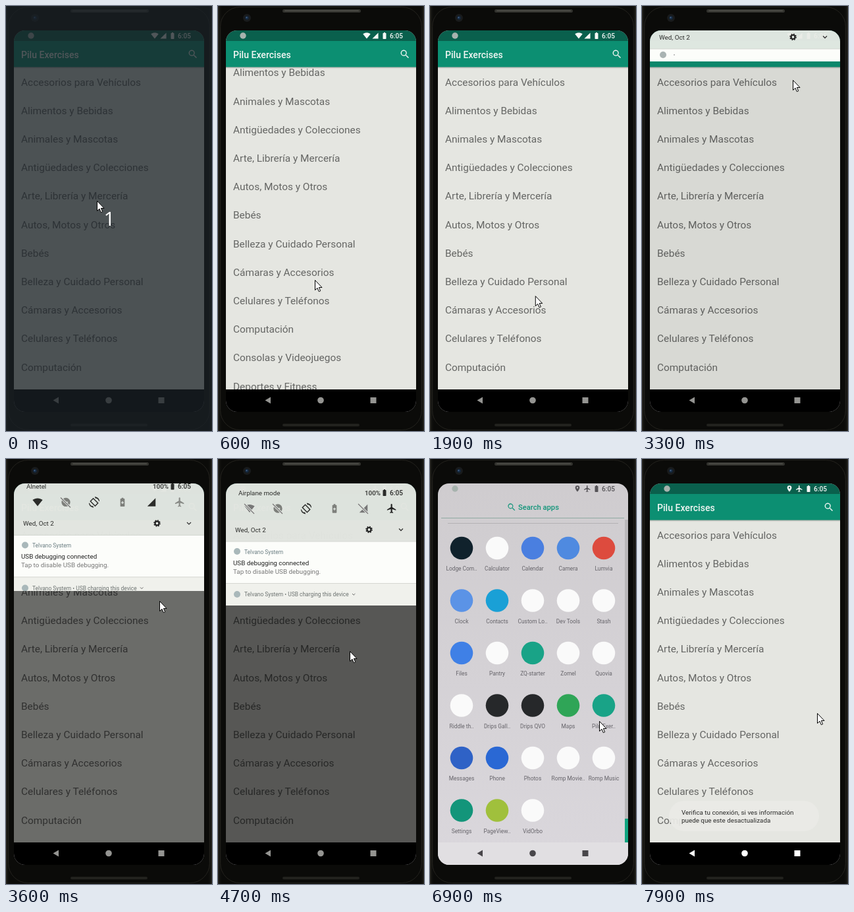
An HTML page for the animation above (8000 ms loop, 313x644 px).

```html
<!DOCTYPE html>
<html lang="es">
<head>
<meta charset="utf-8">
<title>Phone demo</title>
<style>
html, body { margin: 0; width: 100%; height: 100%; overflow: hidden; background: #0b0b09; }
svg { display: block; width: 100vw; height: 100vh; font-family: Roboto, "Noto Sans", sans-serif; }
</style>
</head>
<body>
<svg id="stage" viewBox="0 0 313 644"></svg>
<script>
const LOOP = 8000, STEP = 100;
const TOP = 37, SHADE_END = 222, ROW = 43.2;

const categories = [
  'Accesorios para Vehículos', 'Alimentos y Bebidas', 'Animales y Mascotas',
  'Antigüedades y Colecciones', 'Arte, Librería y Mercería', 'Autos, Motos y Otros',
  'Bebés', 'Belleza y Cuidado Personal', 'Cámaras y Accesorios', 'Celulares y Teléfonos',
  'Computación', 'Consolas y Videojuegos', 'Deportes y Fitness',
  'Electrodomésticos y Aires Ac.', 'Electrónica, Audio y Video', 'Entradas para Eventos',
  'Herramientas y Construcción', 'Hogar, Muebles y Jardín', 'Industrias y Oficinas',
  'Inmuebles', 'Instrumentos Musicales', 'Joyas y Relojes', 'Juegos y Juguetes'
];

const apps = [
  ['Lodge Com..', '#10222c'], ['Calculator', '#fafafa'], ['Calendar', '#4a7fe0'], ['Camera', '#4f8ae0'], ['Lumvia', '#dd4b3e'],
  ['Clock', '#5b93e6'], ['Contacts', '#1aa0d6'], ['Custom Lo..', '#fafafa'], ['Dev Tools', '#fafafa'], ['Stash', '#fafafa'],
  ['Files', '#3f80e6'], ['Pantry', '#fafafa'], ['ZQ-starter', '#19a387'], ['Zomel', '#fafafa'], ['Quovia', '#fafafa'],
  ['Riddle th..', '#fafafa'], ['Drips Gall..', '#26282a'], ['Drips QVO', '#26282a'], ['Maps', '#2fa557'], ['Pilu Exer..', '#19a387'],
  ['Messages', '#2f62c6'], ['Phone', '#2a68d4'], ['Photos', '#fafafa'], ['Romp Movie..', '#fafafa'], ['Romp Music', '#fafafa'],
  ['Settings', '#13957a'], ['PageView..', '#a0c03c'], ['VidOrbo', '#fafafa']
];

// Icon outlines on a 24 unit grid.
const glyphs = {
  plane: 'M21 16v-2l-8-5V3.5a1.5 1.5 0 0 0-3 0V9l-8 5v2l8-2.5V19l-2 1.5V22l3.5-1 3.5 1v-1.5L13 19v-5.5z',
  search: 'M15.5 14h-.8l-.3-.3A6.5 6.5 0 1 0 13.7 14.4l.3.3v.8l5 5 1.5-1.5zm-6 0a4.5 4.5 0 1 1 0-9 4.5 4.5 0 0 1 0 9z',
  wifi: 'M12 21L.6 6.8C4 4.3 8 3 12 3s8 1.3 11.4 3.8z',
  signal: 'M2 22h20V2z',
  battery: 'M8.3 4H10V2h4v2h1.7Q17 4 17 5.3v15.4Q17 22 15.7 22H8.3Q7 22 7 20.7V5.3Q7 4 8.3 4z',
  saver: 'M8.3 4H10V2h4v2h1.7Q17 4 17 5.3v15.4Q17 22 15.7 22H8.3Q7 22 7 20.7V5.3Q7 4 8.3 4zM11 10v2H9v2h2v2h2v-2h2v-2h-2v-2z',
  pin: 'M12 2a7 7 0 0 0-7 7c0 5.3 7 13 7 13s7-7.700 7-13a7 7 0 0 0-7-7zm0 9.500a2.500 2.500 0 0 1 0-5 2.500 2.500 0 0 1 0 5z',
  dnd: 'M12 2a10 10 0 1 0 0 20 10 10 0 0 0 0-20zM7 11h10v2H7z',
  rotate: 'M10 2.500L2.500 10 14 21.500l7.500-7.500zm0 2.800L18.700 14 14 18.700 5.300 10zM15 .5a11 11 0 0 1 8.500 9.500H22A9 9 0 0 0 16 3.500l-1 1-2-4zM9 23.500A11 11 0 0 1 .5 14H2a9 9 0 0 0 6 6.500l1-1 2 4z'
};

const icon = (name, x, y, size, attrs = '') =>
  `<path d="${glyphs[name]}" fill-rule="evenodd" transform="translate(${x - size / 2} ${y - size / 2}) scale(${size / 24})" ${attrs}/>`;
const text = (str, x, y, size, attrs = '') =>
  `<text x="${x}" y="${y}" font-size="${size}" ${attrs}>${str}</text>`;
const rect = (x, y, w, h, fill, attrs = '') =>
  `<rect x="${x}" y="${y}" width="${w}" height="${h}" fill="${fill}" ${attrs}/>`;
const dot = (x, y, r, fill, attrs = '') => `<circle cx="${x}" cy="${y}" r="${r}" fill="${fill}" ${attrs}/>`;
const slash = (x, y) =>
  `<path d="M${x - 8} ${y - 7}L${x + 7} ${y + 8}" stroke="#e2e5e0" stroke-width="3.200"/><path d="M${x - 8} ${y - 7}L${x + 7} ${y + 8}" stroke="#777" stroke-width="1.300"/>`;

const body = `
  ${rect(0, 0, 313, 644, '#0b0b09')}
  ${rect(0, 0, 6, 644, 'url(#edge)')}
  <rect x="307" width="6" height="644" fill="url(#edge)" transform="rotate(180 310 322)"/>
  <rect x="3.500" y="1.500" width="306" height="641" rx="30" fill="none" stroke="#23221d"/>
  ${rect(98, 5, 119, 5, '#32322e', 'rx="2.500"')}${rect(101, 6.500, 113, 1.500, '#50504a', 'rx=".7"')}
  ${rect(98, 633, 117, 4, '#22221e', 'rx="2"')}
  ${dot(44, 18, 6, '#191b1c')}${dot(44, 18, 2.800, '#14283f')}${dot(43.500, 17.500, 1, '#526f96')}`;

const drawer = `
  ${rect(12, 37, 289, 578, 'url(#wall)')}
  ${rect(296, 92, 5, 489, '#b9b7b9')}${rect(296, 545, 5, 36, '#10a47f')}
  ${icon('search', 124, 73, 15, 'fill="#12957a"')}
  ${text('Search apps', 134, 77, 11.200, 'fill="#12957a" font-weight="500"')}
  ${rect(17, 89, 278, 1, '#8fa9a2')}${rect(27, 97, 259, 1, '#b3b1b4')}
  ${apps.map(([name, color], i) => {
    const x = 48 + i % 5 * 54, y = 135 + Math.floor(i / 5) * 79.500;
    return dot(x, y, 17.300, color) + text(name, x, y + 34, 8.400, 'fill="#66646a" text-anchor="middle"');
  }).join('')}`;

const app = `
  ${rect(12, 37, 289, 16, '#0a604d')}
  <g clip-path="url(#listClip)">
    ${rect(12, 92, 289, 489, '#e5e6e1')}
    <g id="list" fill="#656664">${categories.map((c, i) => text(c, 23, 120.600 + i * ROW, 15.430)).join('')}</g>
  </g>
  ${rect(12, 92, 289, 3, 'url(#shadow)')}
  ${rect(12, 53, 289, 39.500, '#0c8f72')}
  ${text('Pilu Exercises', 23, 78.600, 14.060, 'fill="#f1f6f3" font-weight="500"')}
  ${icon('search', 284, 73, 17, 'fill="#f1f6f3"')}`;

const status = `
  ${dot(38, 45, 4.700, '#a7b3ae')}
  ${icon('battery', 253, 45, 12)}
  ${text('6:05', 261, 48.700, 10.100, 'font-weight="500"')}
  <g id="online">${icon('wifi', 226, 45, 12)}${icon('signal', 239, 45, 11)}</g>
  <g id="offline">${icon('plane', 239, 45, 12)}</g>
  <g id="located">${icon('pin', 224, 45, 11.500)}</g>`;

const shade = `
  <g id="header">
    ${rect(12, -30, 289, 155, '#e9ece7', 'opacity=".95"')}
    <g fill="#2b2c2a">
      <g id="carrier">${text('Alnetel', 31, 54.500, 9.840)}</g>
      <g id="planeMode">${text('Airplane mode', 31, 54.500, 9.840)}</g>
      ${text('100%', 223, 54.500, 9.840, 'font-weight="500"')}
      ${icon('battery', 253, 51, 12)}
      ${text('6:05', 261, 54.700, 10.100, 'font-weight="500"')}
      ${icon('rotate', 134, 75, 17)}
      <g id="radios">${icon('wifi', 48, 75, 16)}${icon('signal', 221, 75, 15)}</g>
      <g id="tilePlane">${icon('plane', 264, 75, 17)}</g>
      ${text('Wed, Oct 2', 26, 110.500, 9.840)}
    </g>
    <g fill="#7d7f7b">${icon('dnd', 91, 75, 16)}${icon('saver', 177, 75, 16)}</g>
    ${slash(91, 75)}
    <g id="radiosOff">${slash(48, 75)}${slash(221, 75)}</g>
    <circle id="tap" cx="264" cy="75" r="17" opacity=".12"/>
    <circle cx="229.500" cy="107" r="3" fill="none" stroke="#222" stroke-width="2.200"/>
    <circle cx="229.500" cy="107" r="4.600" fill="none" stroke="#222" stroke-width="1.400" stroke-dasharray="1.900 1.711"/>
    <path d="M275 105.500l3 3 3-3" fill="none" stroke="#333" stroke-width="1.300"/>
    ${rect(12, 125, 289, 64, '#fcfdfa')}${rect(12, 124.500, 289, 1, '#d5d8d3')}
    ${rect(12, 188, 289, 34, '#f0f1ec')}${rect(12, 188, 289, 1, '#d5d6d1')}
    <g id="shelf">${dot(32, 134, 5, '#a9b3b2')}${dot(49, 134, 0.800, '#777')}</g>
    <g id="notices">
      ${dot(29, 140, 5, '#a9b8ba')}${text('Telvano System', 40, 143.500, 8.440, 'fill="#6a7d82"')}
      ${text('USB debugging connected', 23, 160.500, 9.840, 'fill="#222"')}
      ${text('Tap to disable USB debugging.', 23, 174, 9.840, 'fill="#777"')}
      ${dot(29, 205, 5, '#a9b8ba')}${text('Telvano System • USB charging this device', 40, 208.200, 8.440, 'fill="#6d7371"')}
      <path d="M204 204l2.200 2.200 2.200-2.200" fill="none" stroke="#666"/>
    </g>
  </g>`;

const toast = `
  ${rect(41, 518, 228, 46, '#ebebe7', 'rx="23" opacity=".93"')}
  <g fill="#2b2b2a">${text('Verifica tu conexión, si ves información', 60, 539, 9.840)}
  ${text('puede que este desactualizada', 60, 551, 9.840)}</g>`;

const stage = document.getElementById('stage');
stage.innerHTML = `
  <defs>
    <clipPath id="screen"><rect x="12" y="37" width="289" height="578" rx="17"/></clipPath>
    <clipPath id="listClip"><rect x="12" y="92" width="289" height="489"/></clipPath>
    <clipPath id="shadeClip"><rect id="shadeBox" x="12" y="37" width="289" height="0"/></clipPath>
    <linearGradient id="edge"><stop stop-color="#2a2822"/><stop offset=".4" stop-color="#12120f"/><stop offset="1" stop-color="#0b0b09"/></linearGradient>
    <linearGradient id="wall" x2="0" y2="1"><stop stop-color="#cfcccf"/><stop offset="1" stop-color="#dad7dc"/></linearGradient>
    <linearGradient id="shadow" x2="0" y2="1"><stop stop-opacity=".3"/><stop offset="1" stop-opacity="0"/></linearGradient>
  </defs>
  ${body}
  <g clip-path="url(#screen)">
    <g id="drawer">${drawer}</g>
    <rect id="navBar" x="12" y="581" width="289" height="34"/>
    <g id="app">${app}</g>
    <g id="status">${status}</g>
    ${rect(38, 582, 76, 33, '#fff', 'id="ripple" rx="16" opacity=".1"')}
    <g id="nav"><path d="M71.500 597.500l8.500-5v10z"/>${dot(156, 597.500, 4.800, 'inherit')}<path d="M231.500 593h9v9h-9z"/></g>
    <g id="toast">${toast}</g>
    ${rect(12, 37, 289, 544, '#000', 'id="scrim"')}
    <g clip-path="url(#shadeClip)">${shade}</g>
  </g>
  <g id="countdown">
    ${rect(0, 0, 313, 644, '#1a2026', 'opacity=".75"')}
    <text x="157" y="333" font-size="30" fill="#fff" text-anchor="middle" font-family="Open Sans, sans-serif">1</text>
  </g>
  <path id="cursor" d="M.5.5V15.500L4 12.300 6.300 17.700 8.700 16.700 6.400 11.500H11z" fill="#fff" stroke="#000"/>`;

const el = {};
stage.querySelectorAll('[id]').forEach(node => {
  el[node.id] = node;
  // Circles marked "inherit" take the colour of their group.
});
el.nav.querySelector('circle').removeAttribute('fill');

const track = (keys, t) => {
  const i = keys.findIndex(k => k[0] > t);
  if (i < 0) return keys[keys.length - 1].slice(1);
  const [a, b] = [keys[i - 1], keys[i]];
  const p = (t - a[0]) / (b[0] - a[0]);
  return a.slice(1).map((v, j) => v + (b[j + 1] - v) * p);
};

const cursorPath = [
  [0, 138, 295], [500, 146, 470], [900, 150, 250], [1100, 147, 174], [1400, 147, 174],
  [1800, 152, 488], [2700, 222, 48], [3000, 222, 48], [3300, 229, 112], [3600, 233, 215],
  [3700, 236, 205], [3900, 257, 92], [4000, 257, 75], [4400, 257, 75], [4700, 200, 291],
  [4800, 200, 291], [5000, 195, 131], [5100, 195, 131], [6000, 75, 597], [6400, 75, 597],
  [6500, 143, 560], [6600, 143, 560], [6900, 257, 397], [7100, 266, 385]
];
const scrollPath = [[0, 0], [500, 0], [900, 230], [1000, 300], [1200, 428], [1400, 470], [1500, 430], [1800, 0]];
const shadePath = [[0, 37], [3000, 37], [3100, 64], [3300, 84], [3600, 200], [3800, 222], [4800, 222], [4900, 110], [5000, 37]];
const appPath = [
  [0, 0, 1], [6000, 0, 1], [6100, 6, 1], [6200, 28, .45], [6300, 60, 0],
  [7200, 60, 0], [7300, 40, .4], [7400, 12, .85], [7500, 0, 1]
];
const toastPath = [[0, 0], [7700, 0], [7800, .5], [7900, 1]];

const show = (name, on) => el[name].setAttribute('display', on ? 'inline' : 'none');
const move = (name, x, y) => el[name].setAttribute('transform', `translate(${x} ${y})`);
const set = (name, attr, value) => el[name].setAttribute(attr, value);

function draw(time) {
  const t = Math.floor(time / STEP) * STEP;
  const atHome = t >= 6300 && t < 7300;
  const airplane = t >= 4400;

  move('cursor', ...track(cursorPath, t));
  move('list', 0, -track(scrollPath, t)[0]);

  const [drop, alpha] = track(appPath, t);
  move('app', 0, drop);
  set('app', 'opacity', alpha);

  const bottom = track(shadePath, t)[0];
  const open = (bottom - 84) / (SHADE_END - 84);
  set('shadeBox', 'height', bottom - TOP);
  move('header', 0, -60 * (1 - open));
  set('scrim', 'opacity', bottom > TOP ? Math.max(0, .06 + .56 * open) : 0);
  show('shelf', open < .3);
  show('notices', open >= .3);
  show('carrier', !airplane);
  show('planeMode', airplane);
  show('radiosOff', airplane);
  set('radios', 'fill', airplane ? '#777' : '#2b2c2a');
  set('tilePlane', 'fill', airplane ? '#222' : '#888a86');
  show('tap', t >= 4300 && t < 4600);

  show('online', !airplane);
  show('offline', airplane);
  show('located', t >= 6300);
  set('status', 'fill', atHome ? '#555357' : '#f4f7f5');

  set('navBar', 'fill', atHome ? '#e1dfe2' : '#000');
  set('nav', 'fill', atHome ? '#48464a' : t < 6000 ? '#949491' : '#fff');
  show('ripple', t >= 6000 && t < 6300);
  set('toast', 'opacity', track(toastPath, t)[0]);
  show('countdown', t < 100);
}

const start = performance.now();
function tick(now) {
  draw(Math.max(0, now - start) % LOOP);
  requestAnimationFrame(tick);
}
draw(0);
requestAnimationFrame(tick);
</script>
</body>
</html>
```
